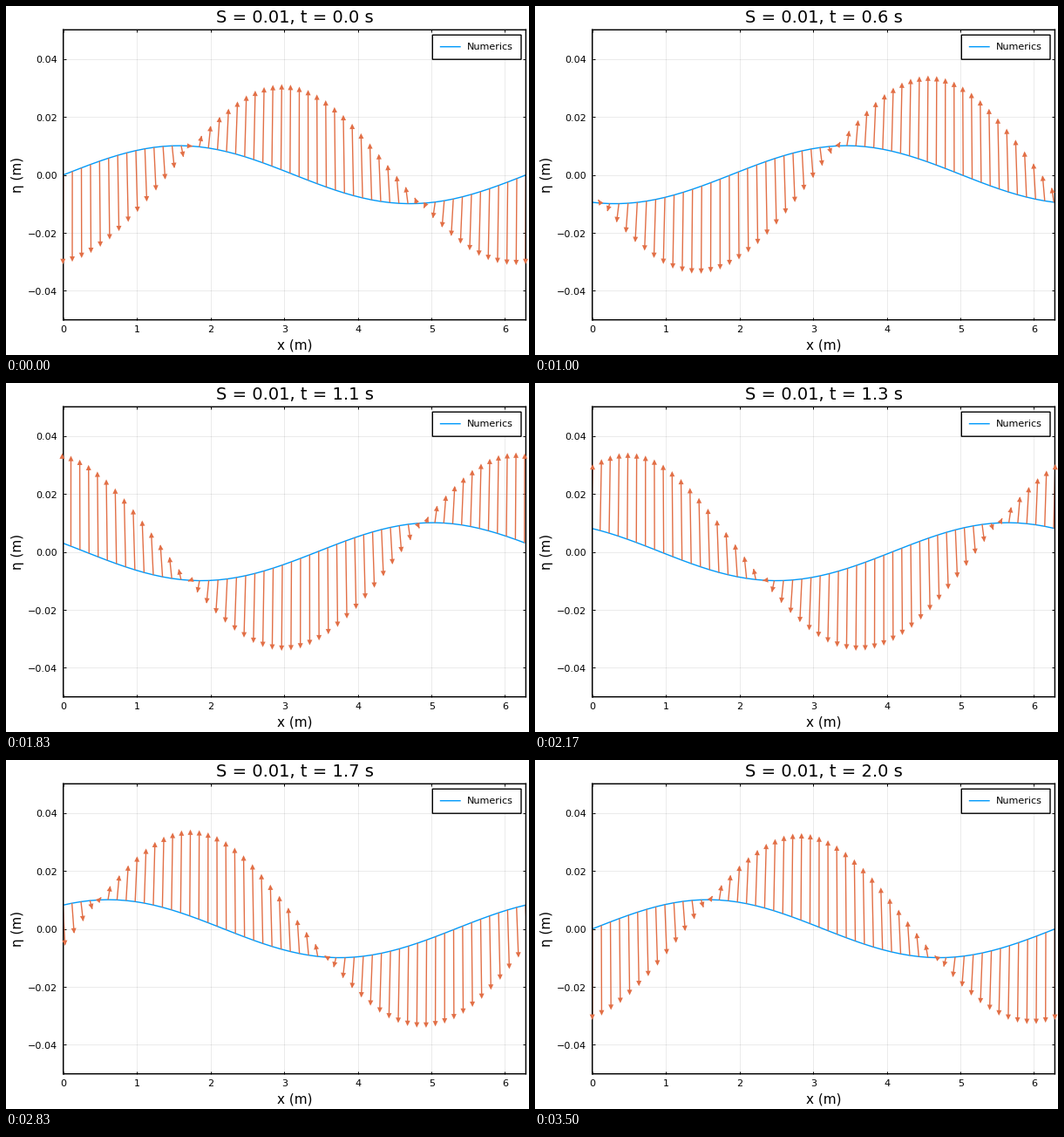
Write a matplotlib script that moves like this. It is 600 px wide and 400 px high and loops after 3.67 s.

```python
import numpy as np
import matplotlib.pyplot as plt
from matplotlib.animation import FuncAnimation
from matplotlib.collections import LineCollection, PolyCollection
from matplotlib.patches import Rectangle

plt.rcParams["font.family"] = "DejaVu Sans"

W, H = 600, 400
LEFT, RIGHT, TOP, BOTTOM = 65.7, 596.4, 27.3, 359.7
BLUE, ORANGE = "#009afa", "#e26f46"

AMP = 0.01
OMEGA = np.sqrt(9.81)
PERIOD = 2 * np.pi / OMEGA
X0 = np.linspace(0, 2 * np.pi, 52)
TIMES = np.append(np.arange(21) * 0.1, PERIOD)
LOOP_MS = 3670
TICKS = 10  # drawn frames per time step

PX = np.array([(RIGHT - LEFT) / (2 * np.pi), (BOTTOM - TOP) / 0.1])
HEAD_LEN, HEAD_HALF = 6.2, 3.0

fig = plt.figure(figsize=(W / 100, H / 100), dpi=100, facecolor="white")
ax = fig.add_axes([LEFT / W, 1 - BOTTOM / H,
                   (RIGHT - LEFT) / W, (BOTTOM - TOP) / H])
ax.set_xlim(0, 2 * np.pi)
ax.set_ylim(-0.05, 0.05)
ax.set_axisbelow(True)
ax.set_xticks(range(7))
ax.set_yticks(np.arange(-2, 3) * 0.02)
ax.grid(color="black", alpha=0.1, linewidth=0.55)
ax.tick_params(direction="in", length=2.4, width=0.7, top=True, right=True,
               labelbottom=False, labelleft=False)
for spine in ax.spines.values():
    spine.set_linewidth(1.05)
    spine.set_snap(False)


def label(x, y, text, size, ha="center", **kw):
    """Text with its baseline at stage pixel (x, y), y counted downwards."""
    return fig.text(x / W, 1 - y / H, text, fontsize=size, ha=ha,
                    va=kw.pop("va", "baseline"), **kw)


for n in range(7):
    label(LEFT + n * PX[0] + 0.4, 374.3, str(n), 8)
for n in range(-2, 3):
    text = f"{n * 0.02:.2f}".replace("-", "\u2212")
    label(59, (TOP + BOTTOM) / 2 - n * 0.02 * PX[1] + 4.6, text, 8, "right")

mid_x = (LEFT + RIGHT) / 2
title = label(mid_x, 19.4, "", 14)
label(mid_x, 393.5, "x (m)", 11)
label(20.8, 193.5, "\u03b7 (m)", 11, "right", va="center", rotation=90)

# Legend
fig.add_artist(Rectangle((489.3 / W, 1 - 61.2 / H), 101.7 / W, 28 / H,
                         facecolor="white", edgecolor="black",
                         linewidth=1.0, snap=False, zorder=5))
fig.add_artist(plt.Line2D([498.5 / W, 521 / W], [1 - 46.7 / H] * 2,
                          color=BLUE, linewidth=1, snap=False, zorder=6))
label(529, 50.4, "Numerics", 8, "left", zorder=6)

curve, = ax.plot([], [], color=BLUE, linewidth=1, zorder=2.1)
shafts = LineCollection([], colors=ORANGE, linewidths=1, zorder=2.2)
ax.add_collection(shafts, autolim=False)
heads = PolyCollection([], facecolors=ORANGE, edgecolors="none",
                       clip_on=False, zorder=4)
ax.add_collection(heads, autolim=False)


def surface(t):
    """Surface particles carried along by a second-order Stokes wave."""
    x = X0 + AMP * (np.cos(X0 - OMEGA * t) - np.cos(X0))
    phase = x - OMEGA * t
    y = AMP * np.sin(phase) - AMP ** 2 / 2 * np.cos(2 * phase)
    return np.column_stack([x, y])


def velocity(i):
    """Difference quotient: backward in time, forward for the first step."""
    a, b = (i - 1, i) if i else (0, 1)
    return (surface(TIMES[b]) - surface(TIMES[a])) / (TIMES[b] - TIMES[a])


def triangles(tips, vel):
    d = vel * PX
    d = d / np.hypot(d[:, 0], d[:, 1])[:, None]
    side = np.column_stack([-d[:, 1], d[:, 0]]) * HEAD_HALF
    back = -d * HEAD_LEN
    return np.stack([tips, tips + (back + side) / PX,
                     tips + (back - side) / PX], axis=1)


def draw(tick):
    # Each step begins one tick early, so it is on screen by its due time
    i = min((tick + 1) // TICKS, len(TIMES) - 1)
    tails = surface(TIMES[i])
    vel = velocity(i)
    tips = tails + vel
    # Heads that lie too far beyond the frame are dropped
    keep = (tips[:, 0] > -0.0255) & (tips[:, 0] < 2 * np.pi + 0.018)
    curve.set_data(tails[:, 0], tails[:, 1])
    shafts.set_segments(np.stack([tails, tips - 0.03 * vel], axis=1))
    heads.set_verts(triangles(tips[keep], vel[keep]))
    title.set_text(f"S = 0.01, t = {TIMES[i]:.1f} s")
    return curve, shafts, heads, title


FRAMES = len(TIMES) * TICKS
anim = FuncAnimation(fig, draw, frames=FRAMES, interval=LOOP_MS / FRAMES,
                     repeat=True, repeat_delay=0, blit=False)
plt.show()
```
